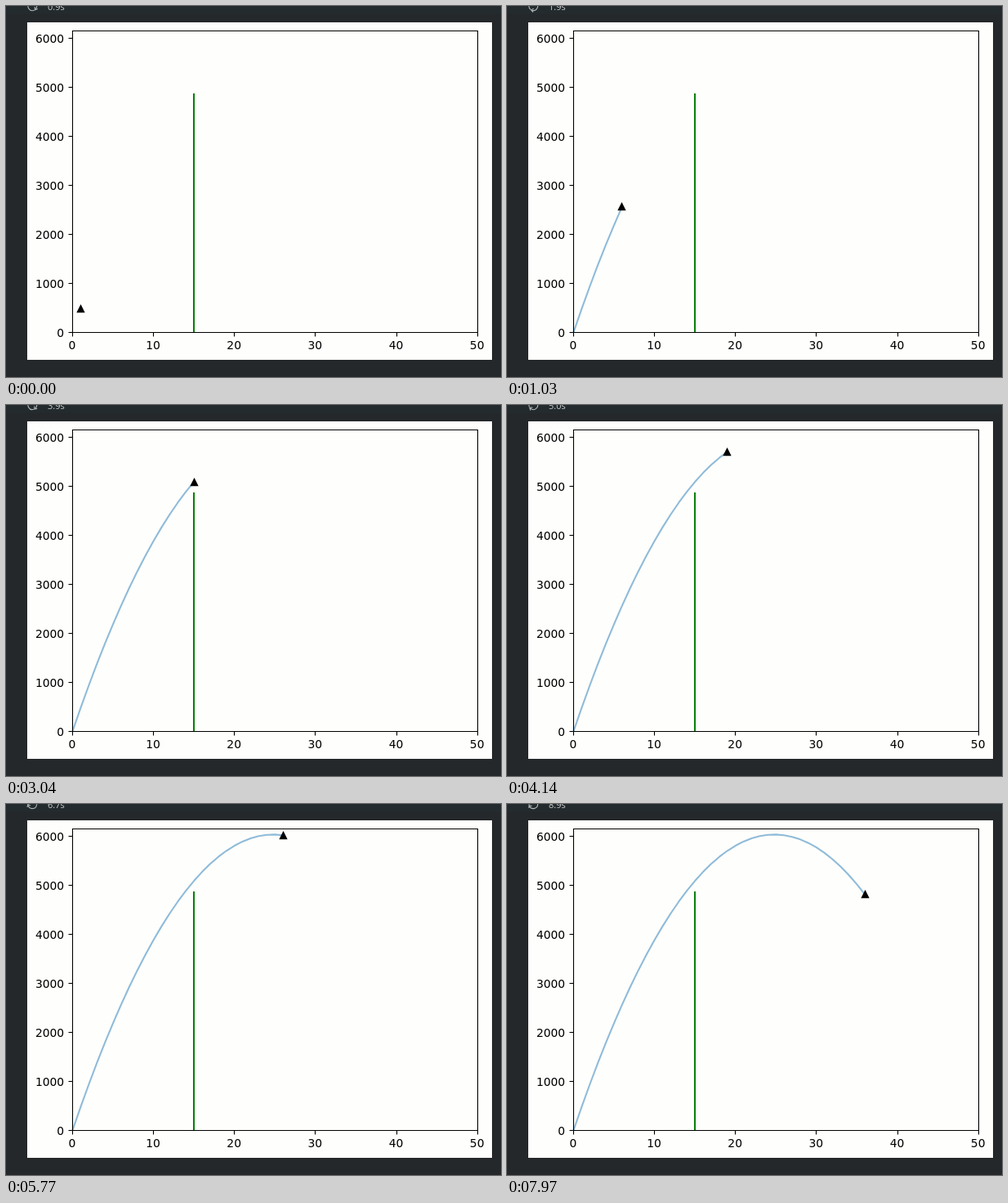
These frames come from a looping animation (606x454 px, 8000 ms). An HTML page:

```html
<!DOCTYPE html>
<html lang="en">
<head>
<meta charset="utf-8">
<title>Projectile path</title>
<style>
  html, body { margin: 0; width: 100%; height: 100%; overflow: hidden; background: #25282a; }
  svg { display: block; width: 606px; height: 454px; }
  .ticks text { font: 13.89px "DejaVu Sans", sans-serif; fill: #000; }
  .axis { fill: none; stroke: #000; stroke-width: 1.11; }
  #timer { font: 11px "Open Sans", "Noto Sans", sans-serif; fill: #ccc; }
  #spinner { fill: none; stroke: #b4b8b8; stroke-width: 1.1; }
</style>
</head>
<body>
<svg viewBox="0 0 606 454">
  <rect width="606" height="454" fill="#25282a"/>
  <rect width="606" height="10" fill="#232b2e"/>
  <g id="spinner">
    <g id="half"><path d="M-4.9 -2A5.3 5.3 0 0 1 5.3 0M2.6 -1.2L5.3 1.2L7 -1.8"/></g>
    <use href="#half" transform="rotate(180)"/>
  </g>
  <text id="timer" x="51" y="5">0.9s</text>
  <rect x="26" y="20" width="569" height="413" fill="#fefefc"/>
  <g class="ticks" id="ticks"></g>
  <path id="trail" fill="none" stroke="#8fbbd9" stroke-width="2.08" stroke-linejoin="round"/>
  <path d="M230 107V399" stroke="#0a800a" stroke-width="2.08"/>
  <path class="axis" d="M81.5 30.5H577.5V399.5H81.5Z"/>
  <path id="marker" d="M0 -4.17L4.17 4.17H-4.17Z" stroke="#000" stroke-width="1.2"/>
</svg>
<script>
const LOOP = 8000, STEP = 230, STEP_OFFSET = 0.85, SPIN = 1500;
const $ = id => document.getElementById(id);
const px = x => 81.4 + 9.915 * x;
const py = y => 399.5 - 0.06 * y;
const height = x => 486.4 * x - 9.8 * x * x;
const snap = v => Math.floor(v) + 0.5;

function addTick(x, y, dx, dy, label, anchor, textX, textY) {
  $('ticks').insertAdjacentHTML('beforeend',
    `<path class="axis" d="M${x} ${y}l${dx} ${dy}"/>` +
    `<text x="${textX}" y="${textY}" text-anchor="${anchor}">${label}</text>`);
}
for (let v = 0; v <= 50; v += 10)
  addTick(snap(px(v)), 399.5, 0, 5, v, 'middle', px(v) - 0.5, 420);
for (let v = 0; v <= 6000; v += 1000)
  addTick(81.5, snap(py(v)), -5, 0, v, 'end', 71.2, snap(py(v)) + 5);

function pathTo(end) {
  let d = `M${px(0)} ${py(0)}`;
  for (let x = 1; x <= end; x++) d += `L${px(x)} ${py(height(x))}`;
  return d;
}

function draw(now) {
  const t = now % LOOP;
  const x = 1 + Math.floor(t / STEP + STEP_OFFSET);
  $('marker').setAttribute('transform', `translate(${snap(px(x))} ${snap(py(height(x)))})`);
  $('trail').setAttribute('d', x > 1 ? pathTo(x) : '');
  $('spinner').setAttribute('transform', `translate(32.3 .3) rotate(${40 + t / SPIN * 360})`);
  $('timer').textContent = (Math.floor(t / 100 + 9.31) / 10).toFixed(1) + 's';
}

const start = performance.now();
function tick() {
  draw(performance.now() - start);
  requestAnimationFrame(tick);
}
tick();
</script>
</body>
</html>
```
